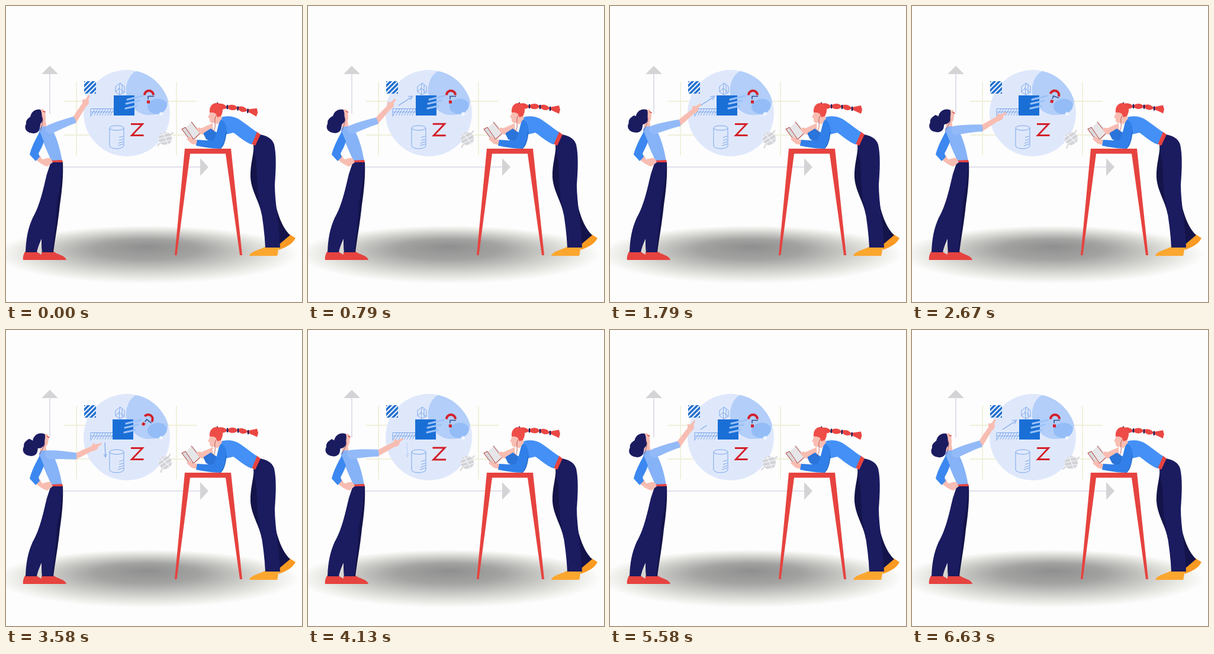
Recreate the animation shown at these times as an HTML page. Size 500x500 px, loop 6680 ms.

```html
<!DOCTYPE html>
<html lang="en">
<head>
<meta charset="utf-8">
<title>Geometry lesson</title>
<style>
html, body { margin: 0; width: 100%; height: 100%; overflow: hidden; background: #fdfdfd; }
svg { display: block; width: 100vw; height: 100vh; }
.line { fill: none; stroke-linecap: round; stroke-linejoin: round; }
.flat { fill: none; }
.navy { fill: #1b1b60; }
.dark { fill: #14144a; }
.skin { fill: #f8bdb2; }
.red { fill: #e6433f; }
.sketch { fill: none; stroke: #7aa6ea; stroke-width: 1; }
.draw { fill: none; stroke: #7aa6ea; stroke-width: 1.2; stroke-dasharray: 1 2; }
</style>
</head>
<body>
<svg viewBox="0 0 500 500">
  <defs>
    <radialGradient id="floor" fy=".36">
      <stop offset="0" stop-color="#8f8f8f"/>
      <stop offset=".35" stop-color="#a3a3a2"/>
      <stop offset=".6" stop-color="#c6c6c3"/>
      <stop offset=".82" stop-color="#e6e6e1"/>
      <stop offset="1" stop-color="#fdfdfd"/>
    </radialGradient>
    <clipPath id="tile"><path d="M132 127h20v21h-20z"/></clipPath>
    <clipPath id="board"><circle cx="204" cy="181" r="73"/></clipPath>
    <clipPath id="leafClip"><circle r="12"/></clipPath>
  </defs>

  <ellipse cx="238" cy="420" rx="256" ry="49" fill="url(#floor)"/>

  <!-- axes and grid -->
  <path d="M74 101l14 14H60zM342 272l-14 15v-30z" fill="#d4d4d6"/>
  <path d="M74 115V182M97 272H328" class="flat" stroke="#d8d8ea" stroke-width="1.6"/>
  <path d="M119 128V252M288 128V252M98 161H322M98 218H322" class="flat" stroke="#efefda" stroke-width="1.8"/>

  <circle cx="204" cy="181" r="73" fill="#dfe8fb"/>
  <g clip-path="url(#board)">
    <path d="M203 148C201 130 210 113 222 109L250 116C268 128 277 148 273 165C270 180 256 185 238 184C220 182 207 166 203 148Z" fill="#b2cef9"/>
    <path d="M239 168C242 156 262 153 270 162C276 171 266 183 254 183C246 181 238 178 239 168Z" fill="#94bdf7"/>
  </g>
  <path d="M262 179a3 3 0 1 1-.1 0z" fill="#fff" opacity=".7"/>

  <!-- shapes on the board -->
  <path d="M132 127h20v21h-20z" fill="#f0f4fd"/>
  <g clip-path="url(#tile)"><path id="stripes" class="flat" stroke="#2270cf" stroke-width="3.4"/></g>
  <path id="ruler" class="sketch"/>
  <path class="sketch" d="M185 136l8-6 7 6v10l-8 4-7-5zM193 130l-2 9 1 11M185 145l6-6 9 7M196 133v14"/>
  <g id="cube">
    <path d="M181 151h35v34h-35z" fill="#1a6fd6"/>
    <path d="M204 158L229 152M202 165L224 160M201 173L219 169" class="line" stroke="#9cc2f8" stroke-width="3.2"/>
  </g>
  <path class="sketch" d="M175 206v30a12 5 0 0 0 24 0v-30M190 232l8-3M189 236l9-3M191 227l7-2M191 222l7-2"/>
  <ellipse class="sketch" cx="187" cy="206" rx="12" ry="4"/>

  <g id="query">
    <path d="M-7 2A7.5 7.5 0 0 1 8 2" class="flat" stroke="#d3202a" stroke-width="4"/>
    <path d="M9 4H-1V9" class="flat" stroke="#30508e" stroke-width="1.6"/>
    <path d="M-3 11h5v5h-5z" fill="#d3202a"/>
  </g>
  <path id="zed" d="M-10.5 -9.5H9L-9 9.5H11" class="flat" stroke="#d3202a" stroke-width="2.9"/>
  <g id="leaf">
    <circle r="11" fill="#d3d3d6"/>
    <g clip-path="url(#leafClip)">
      <path d="M-12 -5L9 -11M-12 1L12 -5M-12 7L12 2M-8 12L12 8M-5 -12L6 12" class="line" stroke="#f1f4fb" stroke-width="1.4"/>
    </g>
    <path d="M9 -7l4 -3M-9 8l-4 4" class="line" stroke="#d3d3d6" stroke-width="2"/>
  </g>

  <g id="rise">
    <path class="draw" pathLength="1" d="M153 168C159 164 167 159 175 154"/>
    <path class="sketch" d="M169 153l8-1-4 7"/>
  </g>
  <g id="drop">
    <path class="draw" pathLength="1" d="M167 190L168 214"/>
    <path class="sketch" d="M165 210l3 5 2-6"/>
  </g>
  <g id="equal">
    <path class="draw" pathLength="1" d="M203 227H215"/>
    <path class="sketch" d="M203 232h12"/>
  </g>

  <!-- teacher -->
  <g>
    <path class="red" d="M32 415H52C57 420 70 423 78 429H29C28 424 30 419 32 415ZM60 415H81C87 420 100 421 102 429H60Z"/>
    <path class="dark" d="M82 270L96 264C97 285 95 310 91 336C88 366 83 392 80 416H61C59 396 60 370 65 345Z"/>
    <path class="navy" d="M76 263H96C94 292 89 320 83 344C77 365 58 390 52 416H33C34 392 37 376 45 358C58 336 64 304 69 284Z"/>
    <path class="navy" d="M66 340L86 330C85 360 81 390 78 416H61C60 390 60 365 66 340Z"/>
    <path class="skin" d="M58 190L67 194L69 208L57 208Z"/>
    <path d="M57 206C62 202 69 203 75 206C84 214 92 243 95 262L77 263C72 250 66 239 62 227C57 219 54 211 57 206Z" fill="#86b2f7"/>
    <path class="red" d="M76 261L95 260L96 264H76Z"/>
    <path class="skin" d="M50 252L57 252L61 259C67 258 72 255 76 258L79 264L70 271C64 270 55 264 49 258Z"/>
    <path d="M57 212C50 225 43 238 40 251L50 262L57 255L55 249C58 243 62 236 64 229Z" fill="#3c88f0"/>
    <path id="tail" class="navy" d="M43 186C36 190 33 194 34 199C30 206 34 212 40 214C49 217 56 214 57 206L59 194Z"/>
    <g id="head">
      <path class="skin" d="M58 176L64 174C66 178 69 181 68 185C69 191 67 197 62 198L56 193Z"/>
      <path d="M65 178l3 1.5" class="line" stroke="#d9433f" stroke-width="1.6"/>
      <path class="navy" d="M60 175C49 173 43 180 42 188L46 200C55 203 62 198 63 192C61 186 63 180 60 175Z"/>
      <path d="M62 187C65 194 60 202 58 210" class="line" stroke="#7b5065" stroke-width=".8"/>
    </g>
    <g id="arm">
      <g id="forearm" class="skin">
        <path d="M-4 -4.5C10 -5 22 -4 31 -3.5C35 -5.5 39 -4 41 -2.5L48 -2Q50 0 48 1L41 2C40 6 34 6.5 29 4.5L-4 5Z"/>
        <path d="M32 -3L36 -7L38 -6L37 -2Z"/>
      </g>
      <path d="M2 -5C18 -7 36 -6.5 50 -6Q53 0 51 5.5C36 6 20 8 6 10C-3 8 -4 -2 2 -5Z" fill="#93baf8"/>
    </g>
  </g>

  <!-- table -->
  <path d="M302 241H380L399 421H395L371 249.500H311L288.500 421H285Z" class="red"/>

  <!-- student -->
  <g>
    <path d="M478 385L489 392C484 402 474 407 461 412L457 402Z" fill="#f99a22"/>
    <path class="dark" d="M452 320C458 350 466 374 480 387L461 403L440 370Z"/>
    <path d="M437 407H460Q460 416 458 422H411C412 415 428 412 437 407Z" fill="#fba62e"/>
    <path class="dark" d="M418 234C420 248 412 266 413 290C415 314 428 330 432 352L450 330L440 250Z"/>
    <path class="navy" d="M427 217C440 218 450 224 453 234C457 252 456 276 454 302C454 332 462 372 463 408H438C437 386 434 362 430 340C421 306 427 275 420 250L418 232Z"/>
    <path class="red" d="M423 212L430 217L421 236L415 233Z"/>
    <path d="M360 190C370 184 384 186 393 191C404 198 416 208 424 213L415 234C402 229 392 219 384 214L367 218Z" fill="#4490f6"/>
    <path class="skin" d="M349 198L331 206L324 207L322 211L331 217L350 212Z"/>
    <path d="M346 207L333 215L338 225L352 232L362 218Z" fill="#2a74da"/>

    <path d="M297 208L303 204L317 223L312 229Z" fill="#d9d9dc"/>
    <path d="M303 206L315 195L330 213L315 227Z" fill="#e6e6e8"/>
    <path d="M303 205L297 208L312 228L316 224ZM313 196L328 215L314 228" class="line" stroke="#b9524e" stroke-width="1.1"/>

    <path class="skin" d="M305 225L311 220L315 225L324 226L325 235L314 233Z"/>
    <path class="skin" d="M321 208L327 205L333 211L334 217L328 216Z"/>
    <path d="M362 191C372 195 375 208 371 222C369 231 367 239 361 241C347 241 333 238 321 236L323 226C334 227 345 227 350 227C357 216 358 200 362 191Z" fill="#317fe8"/>
    <path d="M372 212C371 226 368 236 362 241" class="line" stroke="#2463bb" stroke-width="1.1"/>

    <path class="skin" d="M346 176L343 184L341 188L344 190C343 196 347 199 352 197L357 200L365 190L360 176Z"/>
    <g id="braid">
      <path d="M358 165C365 163 371 166 374 170C368 176 362 174 357 170ZM374 168C381 163 388 165 392 170C386 176 379 175 374 171ZM392 168C399 165 405 168 409 173C402 178 396 176 392 171ZM409 171L424 168L426 175L424 182C418 179 413 177 409 175Z" fill="#ea4743"/>
      <path d="M357 164v6M374 167v5M392 168v5M409 171v5" class="line" stroke="#20205c" stroke-width="2.6"/>
    </g>
    <path d="M344 180C343 169 349 163 357 164C366 166 369 176 363 186L357 188C356 183 354 179 344 180Z" fill="#ee4c47"/>
    <path d="M356 184C348 194 358 201 350 212" class="line" stroke="#b4504e" stroke-width=".9"/>
  </g>
</svg>
<script>
const LOOP = 6680;
const TIMES = [0, 790, 1790, 3580, 4630, 5580, 6630];
const POSES = {
  arm:     [-18, -16, -12, 6, -8, -17, -18],
  forearm: [-58, -49, -41, -26, -35, -55, -58],
  head:    [-4, -1, 5, 11, 3, -3, -4],
  cube:    [1, 1, -1, -1, 1, 1, 0],
  query:   [0, 0, 0, 38, -32, 0, 0],
  braid:   [4, 0, 0, -1, 2, 3, 1],
  leaf:    [0, -14, -18, -22, 8, 0, 4],
  zed:     [1, 1.02, 1, 1, 1.1, 1, 1]
};
const $ = id => document.getElementById(id);
const clamp = x => Math.max(0, Math.min(1, x));

// Smooth curve through the poses, level at peaks so it never overshoots.
function slope(v, i) {
  if (i === 0 || i === v.length - 1) return 0;
  const before = (v[i] - v[i - 1]) / (TIMES[i] - TIMES[i - 1]);
  const after = (v[i + 1] - v[i]) / (TIMES[i + 1] - TIMES[i]);
  return before * after > 0 ? 2 * before * after / (before + after) : 0;
}

function pose(name, t) {
  const v = POSES[name];
  const i = TIMES.findIndex(end => t < end) - 1;
  if (i < 0) return v[v.length - 1];
  const span = TIMES[i + 1] - TIMES[i];
  const x = (t - TIMES[i]) / span;
  const y = 1 - x;
  return v[i] * y * y * (1 + 2 * x) + v[i + 1] * x * x * (3 - 2 * x) +
    span * x * y * (slope(v, i) * y - slope(v, i + 1) * x);
}

const place = (id, value) => $(id).setAttribute('transform', value);

// Draws a stroke between start and full, then fades it out before end.
function sketch(id, t, [start, full, end]) {
  const p = clamp((t - start) / (full - start));
  const [line, tip] = $(id).children;
  $(id).setAttribute('opacity', t < start ? 0 : clamp((end - t) / 200));
  line.setAttribute('stroke-dashoffset', 1 - p);
  tip.setAttribute('opacity', clamp((p - .8) * 5));
}

function render(t) {
  const upper = pose('arm', t);
  const nod = pose('head', t);
  place('arm', `translate(68 208) rotate(${upper})`);
  place('forearm', `translate(50 0) rotate(${pose('forearm', t) - upper})`);
  place('head', `rotate(${nod} 59 204)`);
  place('tail', `translate(${-.25 * (nod + 4)} ${-.15 * (nod + 4)})`);
  place('cube', `translate(${pose('cube', t)} 0)`);
  place('query', `translate(241 148.5) rotate(${pose('query', t)})`);
  place('zed', `translate(221.5 209) scale(${pose('zed', t)})`);
  place('leaf', `translate(269 224) rotate(${pose('leaf', t)})`);
  place('braid', `rotate(${pose('braid', t)} 357 167)`);
  sketch('rise', t, t < 4000 ? [60, 560, 2400] : [5420, 5760, LOOP + 200]);
  sketch('drop', t, [3050, 3500, 4200]);
  sketch('equal', t, [4250, 4580, 5350]);
}

const hatch = (n, part) => Array.from({ length: n }, (_, i) => part(i)).join('');
$('stripes').setAttribute('d', hatch(6, i => `M${137 + i * 8} 122l-30 30`));
$('ruler').setAttribute('d', 'M143 187V173.5H182M143 179H182' +
  hatch(8, i => `M${150 + i * 4.6} 174l-6 11`));

function frame() {
  render(performance.now() % LOOP);
  requestAnimationFrame(frame);
}
frame();
</script>
</body>
</html>
```
